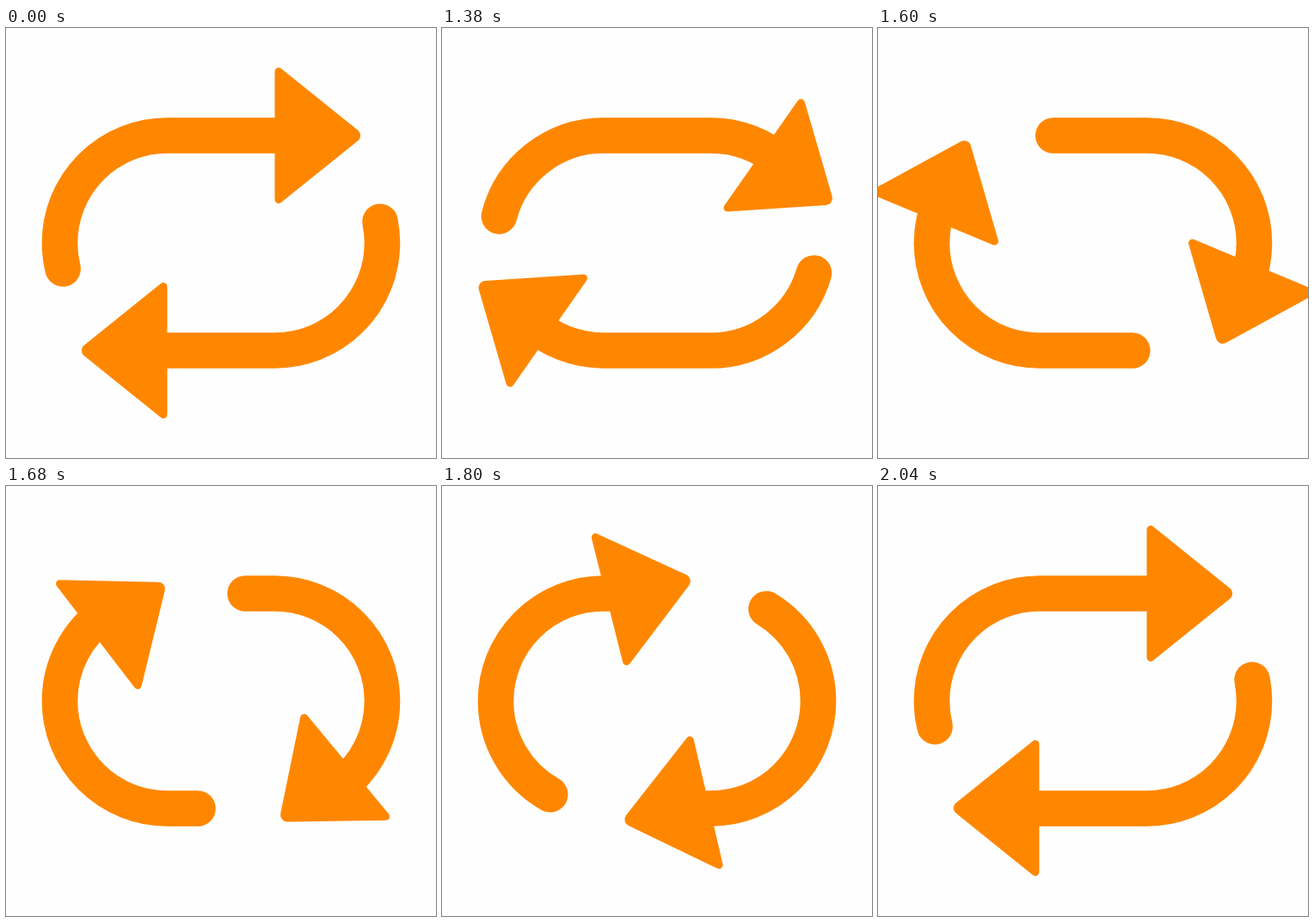
These frames come from a looping animation (500x500 px, 2420 ms). An HTML page:

```html
<!DOCTYPE html>
<html lang="en">
<head>
<meta charset="utf-8">
<title>Repeat arrows</title>
<style>
  html, body { margin: 0; width: 100%; height: 100%; overflow: hidden; background: #fefefe; }
  svg { display: block; width: 100vw; height: 100vh; }
  .tail { fill: none; stroke: #ff8700; stroke-width: 41.6; stroke-linecap: round; }
  .head { fill: #ff8700; }
</style>
</head>
<body>
<svg viewBox="0 0 500 500">
  <defs>
    <path id="track" d="M187.5 375A125 125 0 0 1 187.5 125H312.5A125 125 0 0 1 312.5 375H187.5"/>
    <path id="tip" d="M0-74.5A4.5 4.5 0 0 1 7.3-78L96.5-6.3A8 8 0 0 1 96.5 6.3L7.3 78A4.5 4.5 0 0 1 0 74.5Z"/>
  </defs>
  <g class="arrow"><use class="tail" href="#track"/><use class="head" href="#tip"/></g>
  <g class="arrow" transform="rotate(180 250 250)"><use class="tail" href="#track"/><use class="head" href="#tip"/></g>
</svg>
<script>
const LOOP = 2420, STEP = 20, START = 1200, SPAN = 840;
const R = 125, ARC = Math.PI * R;

// Head knots: time, x, y, heading in degrees, speed in px/ms.
// The second arrow is given in its own half-turned frame.
const arrows = [
  { tail: [-226.7, 296.3], knots: [
    [0, 312.5, 125, 0, 0],
    [180, 371, 145.5, 35, 0.595],
    [400, 436, 274.5, 112.6, 0.78],
    [540, 356, 350.7, 153.4, 0.83],
    [680, 251.5, 374.1, 179.25, 0.63],
    [SPAN, 187.5, 374.5, 180, 0]] },
  { tail: [-221.4, 291], knots: [
    [0, 312.5, 125, 0, 0],
    [180, 374.5, 145.5, 35, 0.595],
    [400, 435, 276.5, 112.6, 0.78],
    [540, 353.5, 350.3, 153.4, 0.83],
    [680, 251, 374.6, 179.25, 0.63],
    [SPAN, 187.5, 375, 180, 0]] }
];

document.querySelectorAll('.arrow').forEach((g, i) => {
  [arrows[i].tailEl, arrows[i].headEl] = g.children;
});

const rad = deg => deg * Math.PI / 180;
const smooth = x => x * x * (3 - 2 * x);

// Cubic Hermite value and slope
function hermite(p, q, v, w, u) {
  const a = 2 * (p - q) + v + w, b = 3 * (q - p) - 2 * v - w;
  return [((a * u + b) * u + v) * u + p, (3 * a * u + 2 * b) * u + v];
}

function headPose(knots, t) {
  const i = Math.max(1, knots.findIndex(k => k[0] >= t));
  const [t0, x0, y0, a0, s0] = knots[i - 1], [t1, x1, y1, a1, s1] = knots[i];
  const span = t1 - t0, u = (t - t0) / span;
  const [x, dx] = hermite(x0, x1, s0 * span * Math.cos(rad(a0)), s1 * span * Math.cos(rad(a1)), u);
  const [y, dy] = hermite(y0, y1, s0 * span * Math.sin(rad(a0)), s1 * span * Math.sin(rad(a1)), u);
  const angle = t <= 0 ? 0 : t >= SPAN ? Math.PI : Math.atan2(dy, dx);
  return { x, y, angle };
}

// Distance along the track, counted from the start of the top straight
function project(x, y) {
  if (x > 312.5) return 125 + R * Math.atan2(x - 312.5, 250 - y);
  return y < 250 ? x - 187.5 : 125 + ARC + 312.5 - x;
}

function draw(t) {
  const p = smooth(t / SPAN);
  for (const { tail, knots, tailEl, headEl } of arrows) {
    const { x, y, angle } = headPose(knots, t);
    const from = tail[0] + (tail[1] - tail[0]) * p;
    const to = project(x + 25 * Math.cos(angle), y + 25 * Math.sin(angle));
    tailEl.setAttribute('stroke-dasharray', `${to - from} 9999`);
    tailEl.setAttribute('stroke-dashoffset', -(ARC + from));
    headEl.setAttribute('transform', `translate(${x} ${y}) rotate(${angle * 180 / Math.PI})`);
  }
}

function tick() {
  const now = performance.now() % LOOP;
  const time = Math.floor((now + 1) / STEP) * STEP % LOOP;
  draw(Math.min(SPAN, Math.max(0, time - START)));
  requestAnimationFrame(tick);
}
tick();
</script>
</body>
</html>
```
